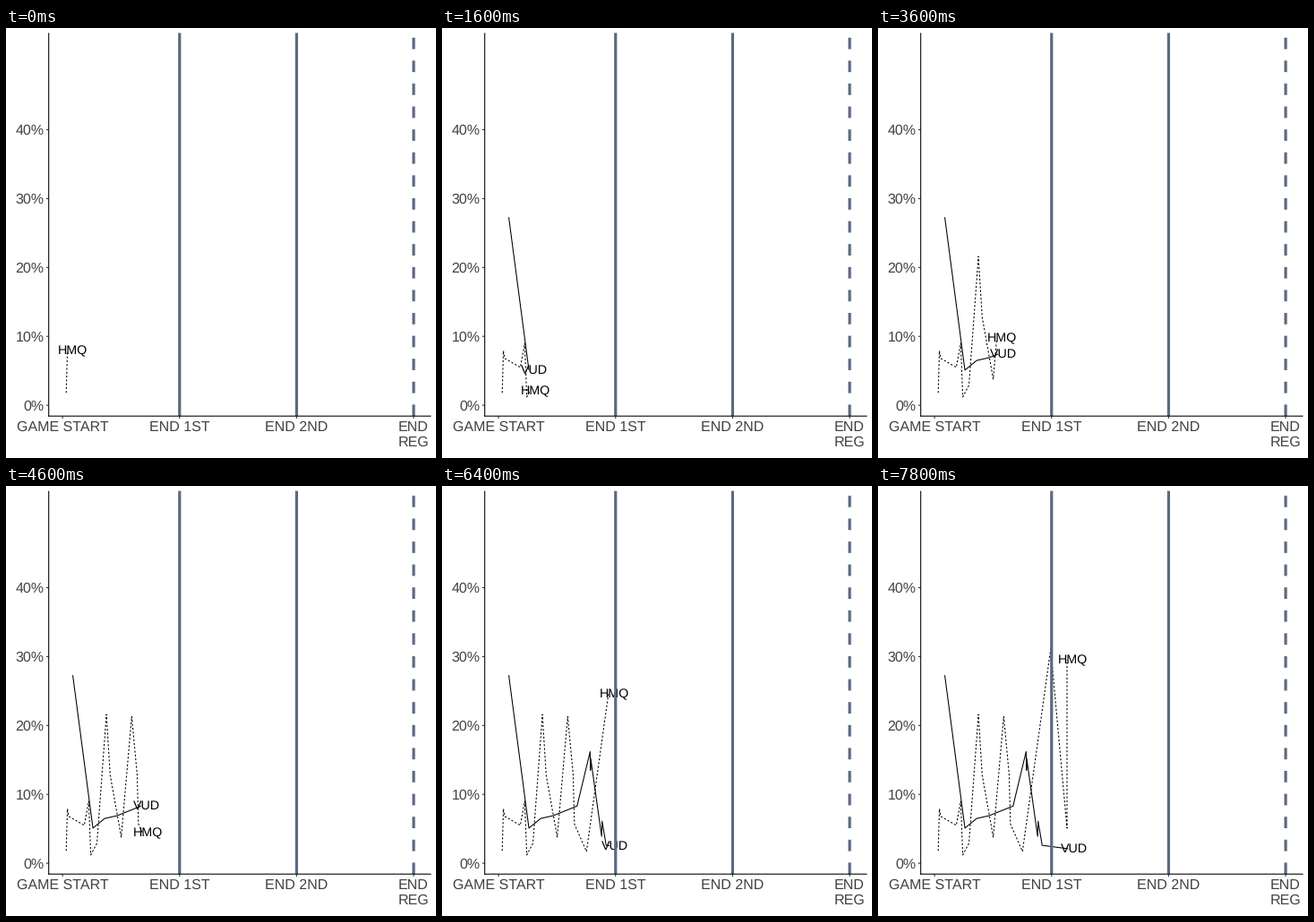
Animation of 480 by 480 pixels, one loop 8 s. Source, as a matplotlib script:

```python
import matplotlib.pyplot as plt
from matplotlib.animation import FuncAnimation

SIZE = 480
FRAMES = 40
INTERVAL = 200
SLATE = "#5A6B82"
GREY = "#424242"
LEFT, RIGHT, TOP, BOTTOM = 47.7, 474.5, 5.5, 433.2
PERIOD = 20            # minutes
START, RATE = 0.58, 1.755   # first minute shown, steps per minute

# Key points: minute of play, percent
DOTTED = [
    (0.63, 1.8), (0.83, 7.9), (1.06, 6.8), (3.72, 5.5), (4.47, 9),
    (4.83, 1.2), (5.88, 2.9), (7.5, 21.6), (8.14, 12.8), (10.03, 3.8),
    (11.82, 21.3), (12.75, 12.9), (12.97, 5.7), (15.03, 1.7),
    (19.85, 31.1), (22.64, 5.1), (22.64, 29.5),
]
SOLID = [
    (1.75, 27.3), (5.19, 5.1), (7.21, 6.5), (9.32, 6.9), (13.42, 8.3),
    (15.65, 16.2), (15.71, 13.5), (15.75, 15.2), (17.62, 3.9),
    (17.7, 6.1), (18.39, 2.6), (22.84, 2.1),
]

plt.rcParams["font.family"] = "Liberation Sans"
plt.rcParams["text.hinting"] = "none"

fig = plt.figure(figsize=(SIZE / 72, SIZE / 72), dpi=72, facecolor="white")
ax = fig.add_axes([0, 0, 1, 1])
ax.set_xlim(0, SIZE)
ax.set_ylim(SIZE, 0)
ax.axis("off")


def to_px(minute, percent):
    return 63.1 + 6.5325 * minute, 421.1 - 7.69 * percent


def step_of(minute):
    return round((minute - START) * RATE)


def stroke(xs, ys, color="black", lw=1.07, style="-", z=2):
    return ax.plot(xs, ys, color=color, lw=lw, ls=style, zorder=z, snap=False,
                   solid_capstyle="butt", dash_capstyle="butt",
                   solid_joinstyle="round")[0]


def label(x, y, text, size=16, color=GREY, ha="center"):
    return ax.text(x, y, text, size=size, color=color, ha=ha, va="baseline",
                   zorder=3)


def draw_axes():
    stroke([LEFT, LEFT], [TOP, BOTTOM + 0.5], z=5)
    stroke([LEFT - 0.5, RIGHT], [BOTTOM, BOTTOM], z=5)
    for percent in range(0, 50, 10):
        y = to_px(0, percent)[1]
        stroke([LEFT - 2.8, LEFT], [y, y], color="#333333")
        label(42.6, y + 5.7, f"{percent}%", ha="right")
    for i, name in enumerate(["GAME START", "END 1ST", "END 2ND", "END"]):
        x = to_px(PERIOD * i, 0)[0]
        stroke([x, x], [BOTTOM, BOTTOM + 2.8], color="#333333")
        label(x, 450.2, name)
        if i:
            style = (0, (4, 4)) if i == 3 else "-"
            stroke([x, x], [BOTTOM, TOP], SLATE, 3.2, style, z=4)
    label(x, 467.3, "REG")


class Series:
    """A line revealed step by step, with its name riding on the tip."""

    def __init__(self, points, name, style):
        self.points = [(step_of(m), *to_px(m, p)) for m, p in points]
        self.line = stroke([], [], style=style)
        self.tag = label(0, 0, name, size=14.2, color="black")

    def reveal(self, step):
        path = [p for p in self.points if p[0] <= step]
        self.tag.set_visible(bool(path))
        if not path:
            self.line.set_data([], [])
            return
        if len(path) < len(self.points):
            a, b = path[-1], self.points[len(path)]
            t = (step - a[0]) / (b[0] - a[0])
            path.append([u + (v - u) * t for u, v in zip(a, b)])
        _, xs, ys = zip(*path)
        self.line.set_data(xs, ys)
        self.tag.set_position((xs[-1] + 6.4, ys[-1] + 3.8))


draw_axes()
series = [Series(SOLID, "VUD", "-"), Series(DOTTED, "HMQ", (0, (2, 2)))]


def update(step):
    for s in series:
        s.reveal(step)
    return []


anim = FuncAnimation(fig, update, frames=FRAMES, interval=INTERVAL,
                     init_func=lambda: update(0), repeat=True, repeat_delay=0)
plt.show()
```
